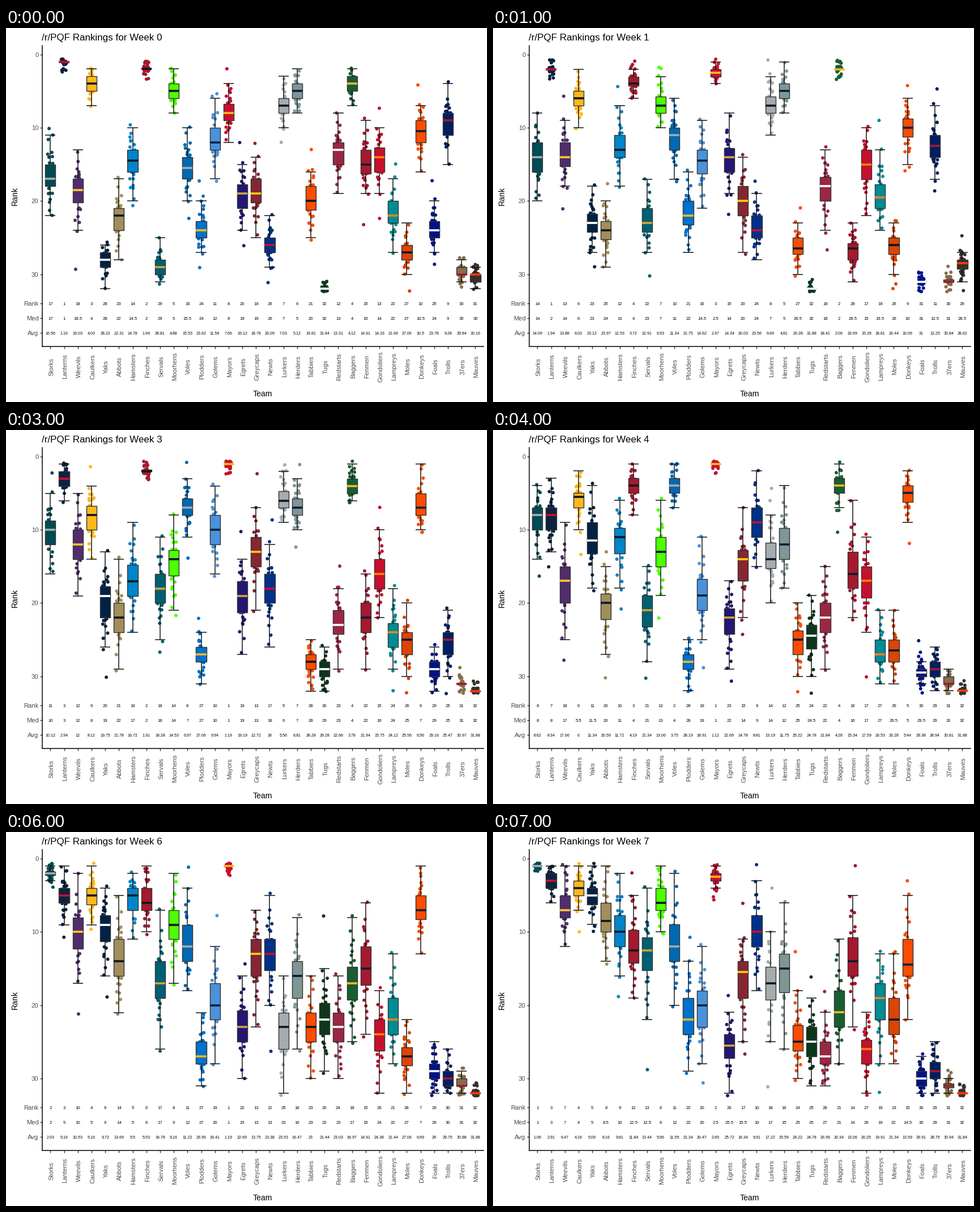
These frames come from a looping animation (849 px wide and 660 px high, 8000 ms). A matplotlib script:

```python
import matplotlib.pyplot as plt
import numpy as np
from matplotlib.animation import FuncAnimation

W, H, DPI = 849, 660, 64
PT = 72 / DPI  # points per pixel
LEFT, RIGHT, TOP, BOTTOM = 63.8, 843, 31, 562.2
INK, GREY, DARK = "#333333", "#4d4d4d", "#101820"
GOLD, RED, NAVY = "#ffb81c", "#c8102e", "#0c2340"
KEY_WEEKS = (0, 1, 3, 4, 6, 7)
WEEKS, VOTERS = 8, 32
BOX = .75

plt.rcParams["font.family"] = "Liberation Sans"
teams = []


def team(name, fill, mid, *medians):
    """Add a team with its median rank in each key week."""
    path = np.interp(range(WEEKS), KEY_WEEKS, medians)
    teams.append((name, fill, mid, np.round(path * 2) / 2))


team("Storks", "#004c54", "#a5acaf", 17, 14, 10, 8, 2, 1)
team("Lanterns", NAVY, RED, 1, 2, 3, 8, 5, 3)
team("Weevils", "#512d6d", "#ffc62f", 18.5, 14, 12, 17, 10, 7)
team("Caulkers", GOLD, DARK, 4, 6, 8, 5.5, 5, 4)
team("Yaks", "#002244", "white", 28, 23, 19, 11.5, 9, 5)
team("Abbots", "#a28d5b", DARK, 22, 24, 22, 20, 14, 8.5)
team("Hamsters", "#0085ca", DARK, 14.5, 13, 17, 11, 5, 10)
team("Finches", "#a6192e", DARK, 2, 4, 2, 4, 6, 12.5)
team("Servals", "#006073", "#d7a22a", 29, 23, 18, 21, 17, 12.5)
team("Moorhens", "#4dff00", "#001433", 5, 7, 14, 13, 9, 6)
team("Voles", "#0069b1", "#a2aaad", 15.5, 11, 7, 4, 12, 12)
team("Plodders", "#0072ce", GOLD, 24, 22, 27, 28, 27, 22)
team("Golems", "#4b92db", NAVY, 12, 14.5, 10, 19, 20, 20)
team("Mayors", RED, GOLD, 8, 2.5, 1, 1, 1, 2.5)
team("Egrets", "#241773", "#cfa43c", 19, 14, 19, 22, 23, 25.5)
team("Greycaps", "#862633", "#ffcd00", 19, 20, 13, 14, 13, 15.5)
team("Newts", "#003087", RED, 26, 24, 18, 9, 13, 10)
team("Lurkers", "#a5acaf", DARK, 7, 7, 6, 14, 23, 17)
team("Herders", "#7f9695", "#041e42", 5, 5, 7, 12, 16, 15)
team("Tabbies", "#fc4c02", DARK, 20, 26.5, 28, 25, 23, 25)
team("Tugs", "#0c371d", "white", 32, 32, 29, 24.5, 22, 25)
team("Redstarts", "#9b2743", "white", 13, 18, 23, 22, 23, 27)
team("Baggers", "#175e33", GOLD, 4, 2, 4, 4, 17, 21)
team("Fenmen", "#a6192e", "#091f2c", 15, 26.5, 22, 16, 15, 14)
team("Gondoliers", RED, "#ff8200", 14, 15, 16, 17, 24, 26)
team("Lampreys", "#008c95", "#f58220", 22, 19.5, 24, 27, 22, 19)
team("Moles", "#dc4405", "#0b162a", 27, 26, 25, 26.5, 27, 22)
team("Donkeys", "#fc4c02", NAVY, 10.5, 10, 7, 5, 7, 14.5)
team("Foals", "#001489", "white", 24, 31, 29, 29.5, 29, 30)
team("Trolls", "#001e62", "#a6192e", 9, 12.5, 25, 29, 30, 29)
team("37ers", "#866d4b", "#9b1b30", 30, 31, 31, 31, 31, 31)
team("Mauves", "#382f2d", "#ff3c00", 30, 28.5, 32, 32, 32, 32)

NAMES, FILLS, MIDS, MEDIANS = zip(*teams)
N = len(teams)
X = np.arange(N)


def cast_votes(med, week, rng):
    """Logistic spread of whole ranks: wide mid-table, tight at both ends."""
    iqr = max(5 * np.sin(np.pi * (med - 1) / 31), 0) ** .7 * 1.55
    iqr = max(iqr * (.7 + .06 * week), .6)
    p = (np.arange(VOTERS) + rng.uniform(.1, .9, VOTERS)) / VOTERS
    offset = np.log(p / (1 - p)) * iqr / 2.2
    skew = rng.uniform(-.3, .3)
    offset *= 1 + skew * np.sign(offset)
    return np.clip(np.round(med + offset), 1, 32)


def box_stats(v):
    q1, med, q3 = np.percentile(v, (25, 50, 75))
    reach = 1.5 * (q3 - q1)
    inside = v[(v >= q1 - reach) & (v <= q3 + reach)]
    return inside.min(), q1, med, q3, inside.max()


fig = plt.figure(figsize=(W / DPI, H / DPI), dpi=DPI, facecolor="white")
ax = fig.add_axes([LEFT / W, 1 - BOTTOM / H, (RIGHT - LEFT) / W, (BOTTOM - TOP) / H])
ax.set_xlim(-.6, N - .4)
for side in ("top", "right"):
    ax.spines[side].set_visible(False)
for side in ("left", "bottom"):
    ax.spines[side].set_linewidth(1.5 * PT)
ax.tick_params(length=3.7 * PT, width=1.4 * PT, color=INK, pad=2.6 * PT,
               labelsize=11.3 * PT, labelcolor=GREY)
ax.set_xticks(X, [""] * N)
ax.set_yticks([0, 10, 20, 30, 34, 36, 38],
              ["0", "10", "20", "30", "Rank", "Med", "Avg"])


def label(x, y, text, size, **kw):
    return fig.text(x / W, 1 - y / H, text, size=size * PT, **kw)


title = label(LEFT - .5, 22, "", 17)
label(453, 650, "Team", 14, ha="center")
label(20, 296.5, "Rank", 14, ha="center", rotation=90, rotation_mode="anchor")
for i, name in enumerate(NAMES):
    ax.text(i + .21, -.0665, name, size=11.3 * PT, color=GREY, ha="center",
            rotation=90, rotation_mode="anchor", transform=ax.get_xaxis_transform())

live = []


def draw(week):
    while live:
        live.pop().remove()
    title.set_text(f"/r/PQF Rankings for Week {week}")

    rng = np.random.default_rng(week)
    votes = np.array([cast_votes(path[week], week, rng) for path in MEDIANS])
    low, q1, med, q3, high = np.array([box_stats(v) for v in votes]).T
    avgs = votes.mean(axis=1)

    xs = X[:, None] + rng.uniform(-.2, .2, votes.shape)
    ys = votes + rng.uniform(-.4, .4, votes.shape)
    best = ys.min()
    pad = .05 * (38 - best)
    ax.set_ylim(38 + pad, best - pad)
    live.append(ax.scatter(xs.ravel(), ys.ravel(), s=(6 * PT) ** 2,
                           c=np.repeat(FILLS, VOTERS), linewidths=0, zorder=1))

    line = dict(colors="#111111", linewidths=1.5 * PT, zorder=2, snap=True)
    a, b = X - BOX / 2, X + BOX / 2
    live.append(ax.hlines(low, a, b, **line))
    live.append(ax.hlines(high, a, b, **line))
    live.append(ax.vlines(X, low, q1, **line))
    live.append(ax.vlines(X, q3, high, **line))
    live.append(ax.bar(X, q3 - q1, BOX, q1, color=FILLS, edgecolor=INK,
                       linewidth=1.4 * PT, zorder=3))
    live.append(ax.hlines(med, a, b, colors=MIDS, linewidths=3.7 * PT, zorder=4))

    order = sorted(range(N), key=lambda i: (med[i], avgs[i]))
    for place, i in enumerate(order, 1):
        rows = ((34, place, 7.7), (36, med[i], 7.7), (38, round(avgs[i], 2), 7.1))
        for y, value, size in rows:
            live.append(ax.text(i, y + .028 * size, f"{value:.4g}", size=size * PT,
                                ha="center", va="baseline"))
    return live


anim = FuncAnimation(fig, draw, frames=WEEKS, interval=1000, repeat=True,
                     repeat_delay=0, blit=False)
plt.show()
```
